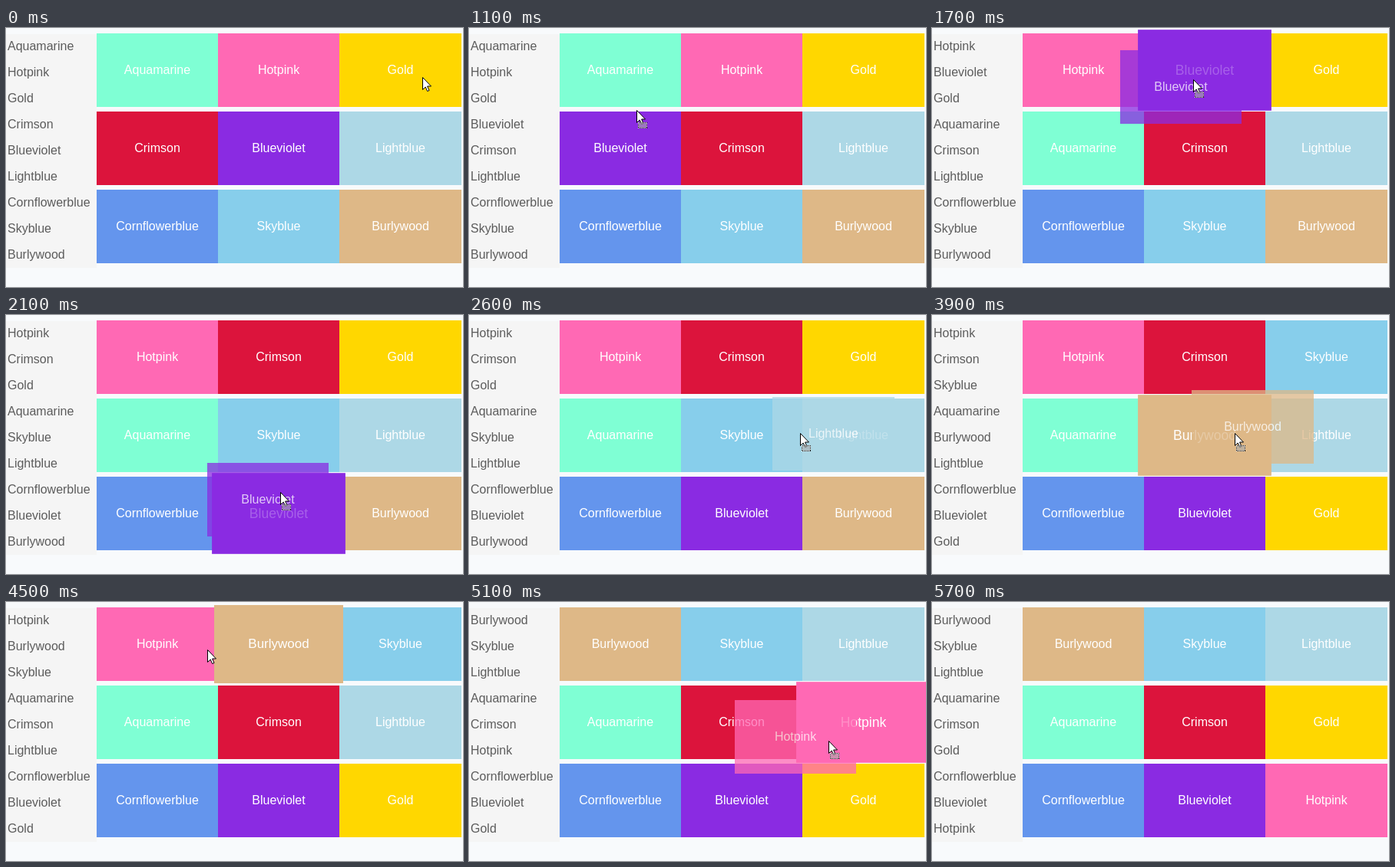
These frames come from a looping animation (595x338 px, 5.9 s). An HTML page:

```html
<!DOCTYPE html>
<html lang="en">
<head>
<meta charset="utf-8">
<title>Drag to swap colour tiles</title>
<style>
  html, body { margin: 0; width: 100%; height: 100%; overflow: hidden; background: #f8fafc; }
  #stage {
    position: relative; width: 595px; height: 338px; overflow: hidden;
    font: 16px "Liberation Sans", Arial, sans-serif;
  }
  #list {
    position: absolute; left: 0; top: 8px; width: 118px; height: 305px;
    background: #f5f5f5; color: #5c5c5c;
  }
  .row { position: absolute; left: 2px; line-height: 34px; white-space: nowrap; }
  .tile {
    position: absolute; height: 96px; line-height: 96px;
    text-align: center; color: #fff; white-space: nowrap;
  }
  #ghost { z-index: 3; opacity: .75; }
  #cursor { position: absolute; left: 0; top: 0; z-index: 4; overflow: visible; }
</style>
</head>
<body>
<div id="stage">
  <div id="list"></div>
  <div id="ghost" class="tile"></div>
  <svg id="cursor" width="20" height="28">
    <path d="M.5 .5V16.5L4.2 13L6.6 18.5L9 17.5L6.6 12H11.5Z" fill="#fff" stroke="#000"/>
    <g id="badge" fill="none" shape-rendering="crispEdges">
      <rect x="2.5" y="16.5" width="11" height="7" fill="#aaa" fill-opacity=".6" stroke="#fff"/>
      <rect x="2.5" y="16.5" width="11" height="7" stroke="#000" stroke-dasharray="1 1"/>
    </g>
  </svg>
</div>
<script>
const NAMES = ['Aquamarine', 'Hotpink', 'Gold', 'Crimson', 'Blueviolet',
  'Lightblue', 'Cornflowerblue', 'Skyblue', 'Burlywood'];
const TICK = 100, LOOP = 5900;
const LEFT = 118, TOP = 7, COL = 158, ROW = 102, TILE = 96;
const HOVER = 1.1, RELEASE = 1.063, HOT = 4;

// Turning points of the pointer: tick, x, y
const PATH = [
  [0, 542, 64], [4, 371, 147], [7, 220, 150], [11, 218, 107], [17, 340, 67],
  [20, 357, 222], [22, 356, 240], [25, 470, 156], [27, 392, 152], [30, 501, 62],
  [33, 502, 231], [35, 502, 270], [37, 490, 165], [40, 346, 148], [43, 340, 57],
  [45, 262, 62], [46, 240, 60], [49, 450, 62], [52, 477, 240], [57, 600, 285]
];
const END = PATH[PATH.length - 1][0];

// Ticks of grab and drop; swaps follow from the cells the pointer crosses
const DRAGS = [[4, 23], [25, 29], [30, 35], [37, 45], [46, 53]];

const $ = id => document.getElementById(id);

function cellBox(i) {
  const col = i % 3;
  return { x: LEFT + COL * col, y: TOP + ROW * Math.floor(i / 3), w: col === 2 ? COL + 1 : COL };
}

// Cell under a point, or -1 between the rows
function hit({ x, y }) {
  const row = Math.floor((y - TOP) / ROW);
  if (y - TOP - row * ROW >= TILE) return -1;
  return row * 3 + Math.floor((x + HOT - LEFT) / COL);
}

function pointer(t) {
  const k = Math.max(1, PATH.findIndex(p => p[0] >= t));
  const [t0, x0, y0] = PATH[k - 1], [t1, x1, y1] = PATH[k];
  const f = (t - t0) / (t1 - t0);
  return { x: Math.round(x0 + (x1 - x0) * f), y: Math.round(y0 + (y1 - y0) * f) };
}

function stateAt(t) {
  const order = NAMES.slice();
  let active = null;
  for (const [grab, drop] of DRAGS) {
    if (t < grab) break;
    const home = hit(pointer(grab));
    let cell = home, moved = false;
    for (let i = grab; i <= t && i < drop; i++) {
      const next = hit(pointer(i));
      if (next < 0 || next === cell) continue;
      [order[cell], order[next]] = [order[next], order[cell]];
      cell = next;
      moved = true;
    }
    if (t <= drop) active = { grab, home, cell, moved, held: t < drop };
  }
  return { order, active };
}

function add(parent, cls) {
  const el = document.createElement('div');
  el.className = cls;
  return parent.appendChild(el);
}

function place(el, x, y, w) {
  el.style.left = x + 'px';
  el.style.top = y + 'px';
  el.style.width = w + 'px';
}

function paint(el, name) {
  el.textContent = name;
  el.style.background = name.toLowerCase();
}

const tiles = NAMES.map((_, i) => {
  const el = add($('stage'), 'tile'), box = cellBox(i);
  place(el, box.x, box.y, box.w);
  return el;
});
const rows = NAMES.map((_, i) => {
  const el = add($('list'), 'row');
  el.style.top = 34 * i - 1 + 'px';
  return el;
});

function render(t) {
  const { order, active } = stateAt(t);
  const pos = pointer(Math.min(t, END));
  const held = !!active && active.held;
  const over = held && hit(pos) >= 0;

  order.forEach((name, i) => {
    const raised = active && active.moved && active.cell === i && (over || !held);
    paint(tiles[i], name);
    tiles[i].style.transform = raised ? `scale(${held ? HOVER : RELEASE})` : 'none';
    tiles[i].style.zIndex = raised ? 2 : 1;
    rows[i].textContent = name;
  });

  $('ghost').style.display = over ? 'block' : 'none';
  if (over) {
    const from = pointer(active.grab), box = cellBox(active.home);
    paint($('ghost'), order[active.cell]);
    place($('ghost'), box.x + pos.x - from.x, box.y + pos.y - from.y, box.w);
  }

  $('cursor').style.display = t < END ? 'block' : 'none';
  $('cursor').style.transform = `translate(${pos.x}px, ${pos.y}px)`;
  $('badge').style.display = held ? 'inline' : 'none';
}

const begin = performance.now();
let shown = -1;
function loop() {
  const t = Math.floor(((performance.now() - begin) % LOOP) / TICK);
  if (t !== shown) render(shown = t);
  requestAnimationFrame(loop);
}
loop();
</script>
</body>
</html>
```
